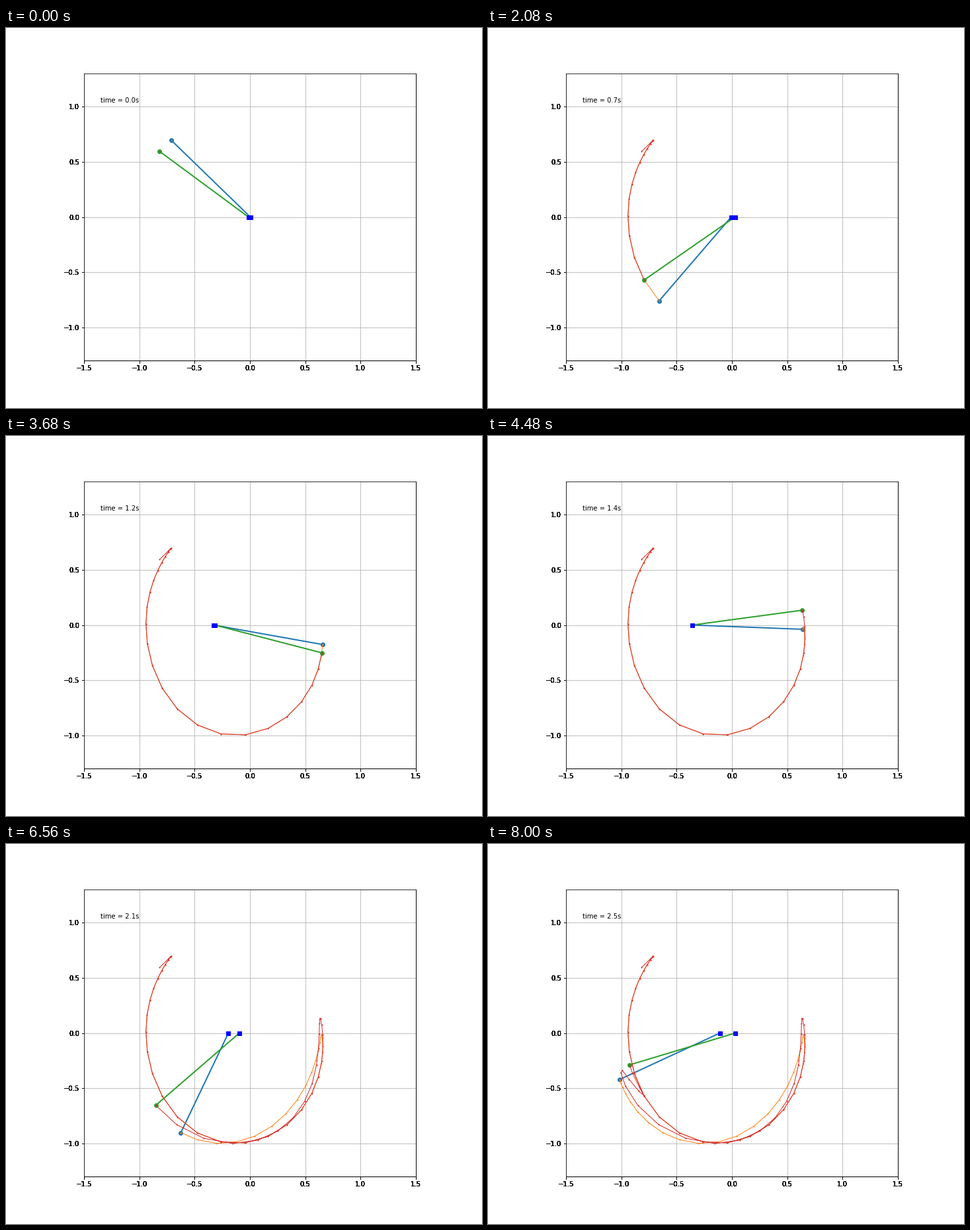
A matplotlib script for the animation above (8160 ms loop, 720 by 576 pixels).

```python
import numpy as np
import matplotlib.pyplot as plt
from matplotlib.animation import FuncAnimation

FRAMES, DT = 51, 0.05
LABEL_LAYERS = 7  # stacked axes give the heavy tick labels

# Key poses: (frame, rod angle in degrees from hanging down, cart position)
SWING_UP = [(0, -134.2, .004), (4, -124.4, .027), (8, -99.6, .056),
            (12, -55.2, .027), (16, 6, -.145), (20, 56.9, -.278)]
FIRST_RETURN = [(24, 84.4, -.337), (28, 87.8, -.359), (32, 69.2, -.376),
                (36, 32.3, -.338), (40, -14.5, -.222), (44, -51.4, -.137),
                (50, -65.1, -.109)]
SECOND_RETURN = [(24, 89.2, -.342), (27, 97.7, -.359), (30, 82, -.371),
                 (34, 39.8, -.25), (37, -1, -.138), (40, -49.1, -.096),
                 (43, -70.3, -.051), (46, -55.6, .028), (49, -73.2, .03)]
SECOND_START = (-126.5, -.013)

plt.rcParams.update({
    "font.family": "DejaVu Sans",
    "font.size": 10,
    "figure.subplot.bottom": 0.125,
})


def smooth_motion(keys, t):
    """Cubic spline through the key poses, at rest at both ends."""
    keys = np.array(keys, float)
    times, poses = keys[:, 0], keys[:, 1:]
    h = np.diff(times)
    slope = np.diff(poses, axis=0) / h[:, None]
    matrix, rhs = np.eye(len(times)), np.zeros_like(poses)
    for i in range(1, len(h)):
        before, after = h[i - 1], h[i]
        matrix[i, i - 1:i + 2] = after, 2 * (before + after), before
        rhs[i] = 3 * (after * slope[i - 1] + before * slope[i])
    speed = np.linalg.solve(matrix, rhs)

    j = np.clip(np.searchsorted(times, t, side="right") - 1, 0, len(h) - 1)
    w = h[j][:, None]
    u = (t - times[j])[:, None] / w
    ease = u * u * (3 - 2 * u)
    return (poses[j] * (1 - ease) + poses[j + 1] * ease
            + w * u * (1 - u) * ((1 - u) * speed[j] - u * speed[j + 1]))


class Pendulum:
    """Unit rod on a sliding cart, with the path of its tip."""

    def __init__(self, ax, poses, rod_color, trail_color):
        degrees, self.cart = poses.T
        angle = np.radians(degrees)
        self.x, self.y = self.cart + np.sin(angle), -np.cos(angle)
        self.rod, = ax.plot([], [], "o-", lw=2, color=rod_color)
        self.trail, = ax.plot([], [], "o-", lw=1, ms=1, color=trail_color)
        self.block, = ax.plot([], [], "bs", zorder=3)

    def update(self, i):
        self.rod.set_data([self.cart[i], self.x[i]], [0, self.y[i]])
        self.trail.set_data(self.x[:i + 1], self.y[:i + 1])
        self.block.set_data([self.cart[i]], [0])


def add_axes(fig, label):
    ax = fig.add_subplot(111, label=label)
    ax.set(xlim=(-1.5, 1.5), ylim=(-1.3, 1.3), aspect="equal")
    ax.set_xticks(np.arange(-1.5, 1.6, 0.5))
    ax.set_yticks(np.arange(-1, 1.1, 0.5))
    return ax


fig = plt.figure(figsize=(10, 8), dpi=72, facecolor="white")
for layer in range(LABEL_LAYERS):
    ax = add_axes(fig, f"layer{layer}")
ax.grid()

# The second pendulum repeats the swing one frame late, then drifts away.
frames = np.arange(FRAMES)
first_poses = smooth_motion(SWING_UP + FIRST_RETURN, frames)
second_poses = np.vstack([
    SECOND_START, smooth_motion(SWING_UP + SECOND_RETURN, frames[:-1])])

pendulums = [Pendulum(ax, first_poses, "C0", "C1"),
             Pendulum(ax, second_poses, "C2", "C3")]
clock = ax.text(0.05, 0.9, "", transform=ax.transAxes)


def update(i):
    for pendulum in pendulums:
        pendulum.update(i)
    clock.set_text(f"time = {i * DT:.1f}s")


anim = FuncAnimation(fig, update, frames=FRAMES, init_func=lambda: update(0),
                     interval=160, repeat=True, repeat_delay=0)
plt.show()
```
